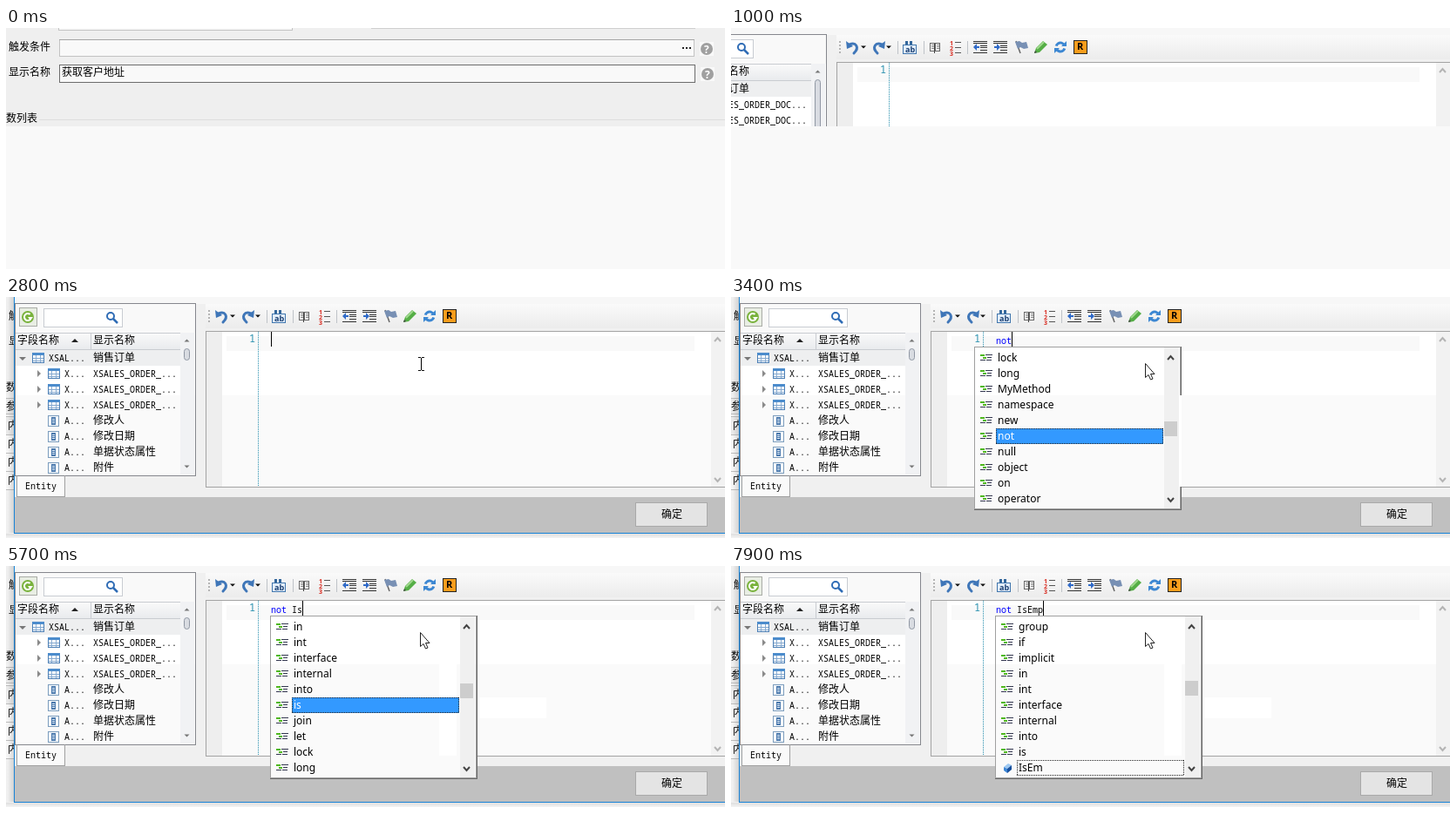
Recreate the animation shown at these times as an HTML page with a canvas. Size 825 by 277 pixels, loop 8000 ms.

```html
<!DOCTYPE html>
<html lang="zh">
<head>
<meta charset="utf-8">
<style>
html, body { margin: 0; width: 100%; height: 100%; overflow: hidden; background: #f9f9f9; }
canvas { display: block; }
</style>
</head>
<body>
<canvas id="stage" width="825" height="277"></canvas>
<script>
const W = 825, H = 277, LOOP = 8000;
const CJK = '12px "Noto Sans CJK SC", "Noto Sans CJK", sans-serif';
const MONO = '10px "Noto Sans Mono", monospace';
const UI = '12px "Noto Sans", sans-serif';
const TEAL = '#2b91af';
const KEYWORDS = ('foreach from get goto group if implicit in int interface internal into is ' +
  'join let lock long MyMethod namespace new not null object on operator').split(' ');

// Editor states: typed text, caret, popup (first item, selected row), tooltip
const STATES = [
  { t: 0, text: '', caret: 1 },
  { t: 2300, text: '' },
  { t: 2800, text: '', caret: 1 },
  { t: 3100, text: 'n', caret: 1, first: 13, row: 5 },
  { t: 3300, text: 'no', caret: 1, first: 15, row: 5 },
  { t: 3400, text: 'not', caret: 1, first: 15, row: 5 },
  { t: 3600, text: 'not', caret: 1 },
  { t: 4000, text: 'not ', caret: 1 },
  { t: 4500, text: 'not ' },
  { t: 5100, text: 'not I', caret: 1, first: 0, row: 5 },
  { t: 5500, text: 'not I', caret: 1, first: 0, row: 5, tip: 'if' },
  { t: 5700, text: 'not Is', caret: 1, first: 7, row: 5 },
  { t: 6100, text: 'not Is', first: 7, row: 5 },
  { t: 6200, text: 'not Is', first: 7, row: 5, tip: 'is' },
  { t: 6800, text: 'not IsE', caret: 1, first: 3, row: 9, soft: 1 },
  { t: 7300, text: 'not IsE', first: 3, row: 9, soft: 1 },
  { t: 7500, text: 'not IsEm', first: 3, row: 9, soft: 1 },
  { t: 7600, text: 'not IsEm', first: 4, row: 9, soft: 1, extra: 'IsE' },
  { t: 7800, text: 'not IsEmp', caret: 1, first: 4, row: 9, soft: 1, extra: 'IsE' },
  { t: 7900, text: 'not IsEmp', caret: 1, first: 4, row: 9, soft: 1, extra: 'IsEm' }
];

let g;

function rect(x, y, w, h, color) {
  g.fillStyle = color;
  g.fillRect(x, y, w, h);
}
function box(x, y, w, h, fill, border) {
  rect(x, y, w, h, border);
  rect(x + 1, y + 1, w - 2, h - 2, fill);
}
function fade(x, y, w, h, from, to, across) {
  const p = across ? g.createLinearGradient(x, 0, x + w, 0) : g.createLinearGradient(0, y, 0, y + h);
  p.addColorStop(0, from);
  p.addColorStop(1, to);
  rect(x, y, w, h, p);
}
// Text centred vertically on cy
function text(s, x, cy, font = CJK, color = '#000') {
  g.font = font;
  g.fillStyle = color;
  g.fillText(s, x, cy + 4);
}
function poly(points, color) {
  g.fillStyle = color;
  g.beginPath();
  points.forEach(([x, y]) => g.lineTo(x, y));
  g.closePath();
  g.fill();
}
function line(points, color, width = 1) {
  g.strokeStyle = color;
  g.lineWidth = width;
  g.beginPath();
  points.forEach(([x, y]) => g.lineTo(x, y));
  g.stroke();
}
function arc(x, y, r, a, b, color, width) {
  g.strokeStyle = color;
  g.lineWidth = width;
  g.beginPath();
  g.arc(x, y, r, a, b);
  g.stroke();
}
function disc(x, y, r, color) {
  g.fillStyle = color;
  g.beginPath();
  g.arc(x, y, r, 0, 7);
  g.fill();
}
function pill(x, y, w, h, fill, border) {
  g.fillStyle = fill;
  g.strokeStyle = border;
  g.lineWidth = 1;
  g.beginPath();
  g.roundRect(x + .5, y + .5, w - 1, h - 1, 3);
  g.fill();
  g.stroke();
}
function dots(x, y, w, h, color) {
  for (let i = 0; i < w; i += 2) for (let j = 0; j < h; j += 2) rect(x + i, y + j, 1, 1, color);
}
function clipped(x, y, w, h, draw) {
  g.save();
  g.beginPath();
  g.rect(x, y, w, h);
  g.clip();
  draw();
  g.restore();
}
function chevron(x, y, dir, color) {
  line([[x - 3.5, y + 2 * dir], [x, y - 2 * dir], [x + 3.5, y + 2 * dir]], color, 2);
}
function triangle(x, y, dir, color, r = 3) {
  poly([[x - r, y - dir * r / 2], [x + r, y - dir * r / 2], [x, y + dir * r / 2]], color);
}

function help(x, y) {
  rect(x - 8, y - 8, 16, 16, '#f9f9f9');
  disc(x, y, 7, '#a0a0a0');
  text('?', x - 3, y + .5, 'bold 12px "Noto Sans", sans-serif', '#fff');
}

function page() {
  rect(0, 0, W, H, '#f9f9f9');
  rect(0, 0, W, 113, '#efefef');
  box(60, -18, 269, 21, '#f9f9f9', '#c4c4c4');
  rect(419, 0, 372, 1, '#cfcfcf');
  text('触发条件', 3, 22);
  box(61, 13, 729, 20, '#f9f9f9', '#c3c3c3');
  rect(61, 13, 729, 1, '#a5a5a5');
  for (let i = 0; i < 3; i++) rect(776 + i * 4, 22, 2, 2, '#222');
  help(804, 24);
  text('显示名称', 3, 51);
  box(61, 42, 730, 21, '#f9f9f9', '#6d6d6d');
  text('获取客户地址', 64, 51);
  help(805, 53);
  text('数列表', 0, 104);
  rect(38, 105, W - 38, 1, '#dedede');
}

function curvedArrow(x, flip) {
  g.save();
  g.translate(x, 22);
  g.scale(flip, 1);
  g.lineCap = 'round';
  g.strokeStyle = '#3f76b8';
  g.lineWidth = 3;
  g.beginPath();
  g.moveTo(-4, -3);
  g.bezierCurveTo(3, -6, 8, 0, 1, 7);
  g.stroke();
  poly([[-8, -7], [-7, 2], [0, -1]], '#3f76b8');
  g.restore();
  triangle(x + 12, 22, 1, '#111');
}

function indent(x, dir) {
  for (let i = 0; i < 6; i++) {
    const short = i > 1 && i < 5;
    rect(short ? x : x - 8, 15 + i * 2.6 | 0, short ? 8 : 16, 1, '#333');
  }
  rect(x - 7, 21, 6, 2, '#2e69c8');
  const tip = x - 4 + dir * 4;
  poly([[tip, 22], [tip - dir * 4, 18], [tip - dir * 4, 26]], '#2e69c8');
}

function toolbar() {
  fade(229, 8, 720, 28, '#fafafa', '#ececec');
  for (let i = 0; i < 4; i++) rect(232, 15 + i * 4, 2, 2, '#b4b4b4');
  curvedArrow(248, 1);
  curvedArrow(277, -1);
  [299, 329, 379].forEach(x => rect(x, 15, 1, 15, '#bfc3c8'));

  rect(308, 15, 3, 6, '#32669b');
  rect(313, 15, 3, 6, '#32669b');
  box(305, 19, 16, 11, '#e2eefb', '#4176ad');
  text('ab', 308, 24, 'bold 9px "Noto Sans", sans-serif', '#183d70');

  [336, 342].forEach(x => {
    box(x, 17, 6, 10, '#fff', '#666');
    for (let i = 0; i < 3; i++) rect(x + 2, 19 + i * 2, 3, 1, '#888');
  });
  rect(341, 18, 1, 11, '#444');

  [1, 2, 3].forEach((n, i) => {
    text(n, 359, 16 + i * 6, 'bold 7px "Noto Sans", sans-serif', '#d92b20');
    rect(365, 16 + i * 6, 7, 1, '#555');
  });

  indent(394, -1);
  indent(417, 1);

  line([[435, 15], [440, 29]], '#666', 1.5);
  poly([[434, 16], [439, 15], [442, 17], [447, 16], [449, 23], [444, 24], [440, 22], [437, 24]], '#7890b4');

  poly([[456, 29], [458, 23], [466, 15], [471, 19], [462, 28]], '#55ae46');
  line([[459, 24], [467, 16]], '#a0d98e', 2);
  poly([[456, 29], [457, 26], [459, 28]], '#444');

  arc(486, 22, 5, 3.4, 5.9, '#3c87d2', 3);
  arc(486, 22, 5, .3, 2.8, '#3c87d2', 3);
  poly([[493, 15], [493, 21], [487, 21]], '#3c87d2');
  poly([[479, 29], [479, 23], [485, 23]], '#3c87d2');

  box(501, 14, 16, 16, '#f99d1c', '#222');
  text('R', 505, 21, 'bold 11px "Noto Sans", sans-serif');
}

function tableIcon(x, cy) {
  box(x, cy - 6, 14, 12, '#fff', '#4c7fb5');
  rect(x, cy - 6, 14, 3, '#4c8ccc');
  [4, 9].forEach(d => rect(x + d, cy - 3, 1, 8, '#86aad0'));
  [0, 3].forEach(d => rect(x + 1, cy + d, 12, 1, '#86aad0'));
}
function columnIcon(x, cy) {
  box(x, cy - 6, 13, 13, '#f5f9fd', '#7c9dbd');
  rect(x + 4, cy - 4, 5, 9, '#4b79ad');
  [-2, 0, 2].forEach(d => rect(x + 5, cy + d, 3, 1, '#dbe8f5'));
}

function tree(early) {
  const col = early ? 81 : 100;
  box(10, 7, 208, 199, '#fafafa', '#85878d');
  rect(11, 8, 206, 105, '#fff');
  rect(11, 8, 206, 33, '#f9f9f9');
  box(15, 12, 21, 22, '#e9eee4', '#a9aca6');
  disc(25, 23, 7, '#79b23c');
  arc(25, 23, 4, .6, 5.4, '#fff', 2);
  poly([[25, 23], [31, 23], [28, 27]], '#fff');
  box(43, 13, 91, 22, '#fff', '#c8ccd2');
  arc(120, 22, 4, 0, 7, '#2f6cb5', 2);
  line([[123, 25], [128, 30]], '#2f6cb5', 2.5);

  fade(11, 41, 205, 20, '#fafafa', '#e8eaed');
  rect(11, 41, 205, 1, '#c9ccd1');
  rect(11, 60, 205, 1, '#c9ccd1');
  rect(col - 3, 42, 1, 18, '#c9ccd1');
  text('字段名称', 13, 50);
  triangle(79, 50, -1, '#222', 4);
  text('显示名称', col, 50);

  clipped(11, 61, 189, 143, () => {
    rect(11, 61, 189, 18, '#eeeff0');
    triangle(19, 71, 1, '#777', 4);
    tableIcon(30, 70);
    text('XSAL...', 49, 70, MONO);
    text('销售订单', col, 70);
    for (let i = 1; i < 4; i++) {
      const y = 70 + i * 18;
      poly([[36, y - 4], [40, y], [36, y + 4]], '#8a8a8a');
      tableIcon(48, y);
      text('X...', 67, y, MONO);
      text('XSALES_ORDER_' + (early ? 'DOC...' : '...'), col, y, MONO);
    }
    ['修改人', '修改日期', '单据状态属性', '附件'].forEach((name, i) => {
      const y = 142 + i * 18;
      columnIcon(48, y);
      text('A...', 67, y, MONO);
      text(name, col, y);
    });
  });

  rect(200, 41, 16, 163, '#f1f2f4');
  triangle(207.5, 50, -1, '#777');
  if (!early) triangle(207.5, 195, 1, '#777');
  pill(204, 59, 7, early ? 90 : 14, '#d9dce2', '#9097a3');
}

function dialog(early) {
  const shift = early ? 108 : 0;
  const right = W + shift;
  rect(9, 0, right, 272, '#f0f0f0');
  rect(9, 0, right, 8, '#f7f7f7');
  toolbar();
  tree(early);

  box(229, 39, right - 228, 180, '#fafafa', '#a3a3a3');
  rect(230, 40, right - 230, 73, '#fff');
  rect(230, 40, 18, 178, '#eeeeee');
  rect(253, 45, 790 + shift - 253, 17, '#f9f9f9');
  rect(809 + shift, 40, 16, 178, '#f2f2f2');
  chevron(816.5 + shift, 49, 1, '#b4b4b4');
  chevron(816.5 + shift, 210, -1, '#b4b4b4');
  text('1', 279, 48, '12px "Noto Sans Mono", monospace', TEAL);
  dots(289, 40, 1, 178, TEAL);

  rect(10, 230, right - 10, 41, '#c0c0c0');
  box(12, 205, 56, 25, '#fafafa', '#a0a0a0');
  rect(13, 205, 54, 1, '#85878d');
  text('Entity', 22, 217, MONO);
  box(722, 236, 83, 28, '#e4e4e4', '#a9a9a9');
  text('确定', 752, 250);
}

function earlyView() {
  rect(0, 0, W, H, '#f9f9f9');
  clipped(0, 0, W, 113, () => {
    g.translate(-108, 0);
    dialog(true);
  });
}

function mainView() {
  page();
  rect(0, 113, 9, 164, '#f0f0f0');
  box(-1, 116, 12, 19, '#e8e8e8', '#bbb');
  text('参', 0, 126);
  for (let i = 0; i < 4; i++) {
    box(-1, 137 + i * 21, 12, 22, i ? '#f6f6f6' : '#e9e9e9', '#bcbcbc');
    text('内', 2, 148 + i * 21);
  }
  dialog(false);
  fade(2, 0, 7, 271, 'rgba(120,120,120,0)', 'rgba(120,120,120,.25)', true);
  rect(9, 0, 1, 272, '#1883d7');
  rect(9, 271, W - 9, 1, '#1883d7');
  fade(0, 272, W, 5, '#dedede', '#f3f3f3');
}

function keywordIcon(x, cy) {
  rect(x, cy - 4, 5, 2, '#4fb81e');
  rect(x + 6, cy - 4, 8, 1, '#33374f');
  rect(x + 3, cy - 1, 4, 2, '#4fb81e');
  rect(x + 8, cy - 1, 5, 1, '#33374f');
  rect(x, cy + 2, 6, 1, '#33374f');
  rect(x + 7, cy + 2, 6, 1, '#33374f');
}
function cubeIcon(x, cy) {
  poly([[x, cy - 1], [x + 5, cy - 5], [x + 9, cy - 3], [x + 4, cy + 1]], '#9cc8f2');
  poly([[x, cy - 1], [x + 4, cy + 1], [x + 4, cy + 6], [x, cy + 3]], '#3d86d6');
  poly([[x + 4, cy + 1], [x + 9, cy - 3], [x + 9, cy + 2], [x + 4, cy + 6]], '#174f9c');
}

function popup(s, x) {
  rect(x, 57, 238, 188, '#696969');
  rect(x, 57, 237, 187, '#a0a0a0');
  rect(x + 1, 58, 235, 185, '#fff');
  rect(x + 1, 113, 235, 130, '#fafafa');
  rect(497, 113, 20, 105, '#fff');
  for (let i = 0; i < 10; i++) {
    const cy = 70 + i * 18, chosen = i === s.row;
    const custom = s.extra && i === 9;
    if (chosen) {
      const top = cy - 9, edge = '#222';
      if (!s.soft) rect(x + 25, top, 192, 18, '#3399ff');
      dots(x + 25, top, 192, 1, edge);
      dots(x + 25, top + 17, 192, 1, edge);
      dots(x + 25, top, 1, 18, edge);
      dots(x + 216, top, 1, 18, edge);
    }
    if (custom) cubeIcon(x + 10, cy);
    else keywordIcon(x + 7, cy);
    text(custom ? s.extra : KEYWORDS[s.first + i], x + 27, cy, UI, chosen && !s.soft ? '#fff' : '#000');
  }
  rect(x + 218, 58, 17, 185, '#f0f0f0');
  chevron(x + 225.5, 70, 1, '#444');
  chevron(x + 225.5, 233, -1, '#444');
  rect(x + 218, 128 + s.first, 15, 17, '#cdcdcd');
}

// Pale traces left in the editor where the first list closed
function trace() {
  clipped(279, 113, 239, 105, () => {
    rect(303, 151, 192, 18, '#fff');
    rect(497, 113, 20, 105, '#fff');
    ['namespace', 'MyMethod', '', 'null', 'object', 'null'].forEach((w, i) =>
      text(w, 306, 124 + i * 18, UI, '#fff'));
  });
}

function pointer(arrow) {
  if (arrow) {
    const p = [[475.5, 76.5], [475.5, 92.5], [479, 89.5], [481.5, 95], [484, 94], [481.5, 88.5], [486, 88.5]];
    poly(p, '#fff');
    line([...p, p[0]], '#222');
  } else {
    rect(476, 70, 1, 14, '#000');
    [[473, 69], [477, 69], [473, 84], [477, 84]].forEach(([x, y]) => rect(x, y, 3, 1, '#000'));
  }
}

function editor(t) {
  const s = STATES.filter(e => e.t <= t).pop();
  const open = s.first !== undefined;
  if (t >= 3600) trace();
  if (t >= 5700) rect(543, 151, 77, 24, '#fff');
  const word = s.text.slice(0, 3);
  text(word, 304, 50, MONO, word === 'not' ? '#0000ff' : '#000');
  text(s.text.slice(4), 328, 50, MONO);
  if (s.caret) rect(304 + s.text.length * 6, 40, 1, 17, '#000');
  if (open) popup(s, t < 3600 ? 279 : 303);
  if (s.tip) {
    box(543, 151, 77, 24, '#fff', '#8a8a8a');
    text(s.tip + ' Keyword', 549, 162, UI, '#444');
  }
  pointer(open);
}

function layer(draw) {
  const c = document.createElement('canvas');
  c.width = W;
  c.height = H;
  g = c.getContext('2d');
  draw();
  return c;
}

const first = layer(page);
const second = layer(earlyView);
const third = layer(mainView);
const fadeEnd = layer(() => { g.drawImage(third, 0, 0); editor(2000); });
const screen = document.getElementById('stage').getContext('2d');

function blend(a, b, mix) {
  g.drawImage(a, 0, 0);
  g.globalAlpha = mix;
  g.drawImage(b, 0, 0);
  g.globalAlpha = 1;
}

function frame(now) {
  const t = Math.floor(now % LOOP / 100) * 100;
  g = screen;
  if (t < 1500) blend(first, second, Math.min(1, t / 1000));
  else if (t < 2000) blend(second, fadeEnd, (t - 1400) / 600);
  else {
    g.drawImage(third, 0, 0);
    editor(t);
  }
}

const start = performance.now();
function tick() {
  frame(performance.now() - start);
  requestAnimationFrame(tick);
}
tick();
</script>
</body>
</html>
```
